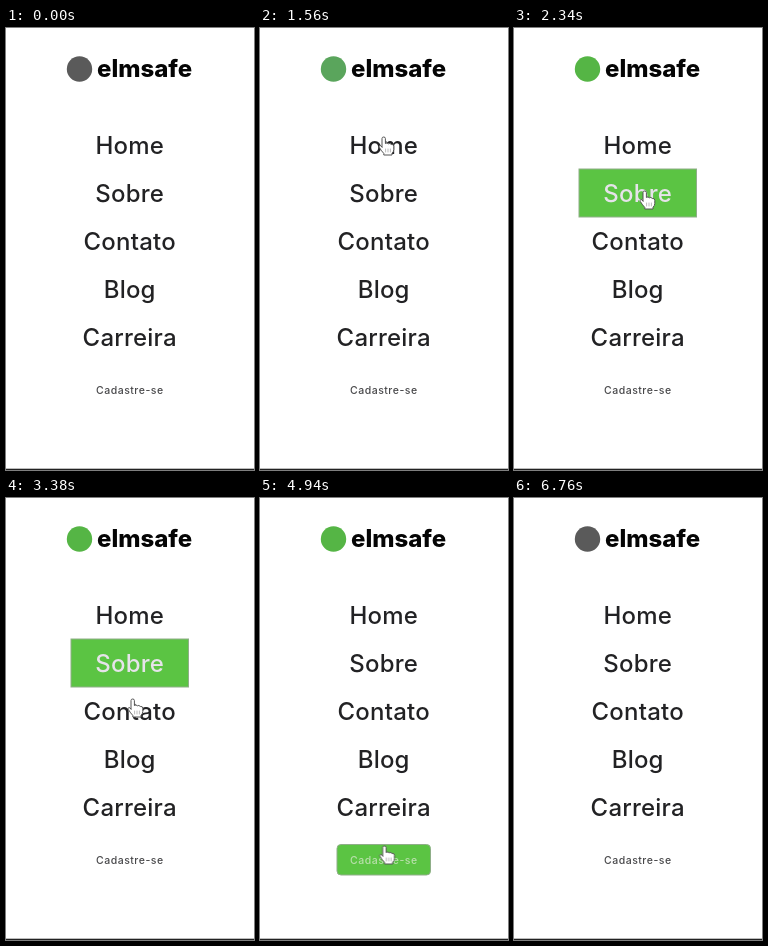
An HTML page that plays this animation: 248 by 442 pixels, repeating every 7.15 s.

```html
<!DOCTYPE html>
<html lang="pt">
<head>
<meta charset="utf-8">
<title>Menu</title>
<style>
  html, body { margin: 0; width: 100%; height: 100%; overflow: hidden; background: #fff; }
  svg { display: block; width: 248px; height: 442px; font-family: Inter, Roboto, sans-serif; }

  /* One loop is 55 ticks of 130 ms, so a tick is 1.818 % */
  .logo, .sobre, .join, .pointer, .arrow, .hand, .sobre-text, .join-text {
    animation: 7150ms step-end infinite;
  }

  .brand { font-size: 24px; font-weight: 800; fill: #050505; }
  .links { font-size: 24px; font-weight: 500; letter-spacing: .2px; fill: #222224; text-anchor: middle; }
  .join-text { font-size: 10.5px; font-weight: 500; letter-spacing: .5px; fill: #48484a; text-anchor: middle; }
  .box { fill: #5bc443; stroke: #8fae88; stroke-width: 1; }

  .logo { animation-name: logo; }
  .sobre { animation-name: sobre; }
  .sobre-text { animation-name: sobre-text; }
  .join { animation-name: join; }
  .join-text { animation-name: join-text; }
  .pointer { animation-name: move; }
  .arrow { animation-name: arrow; }
  .hand { animation-name: hand; }

  @keyframes logo {
    0% { fill: #5a5a5a; }
    9.09% { fill: #5aa55c; }
    25.454% { fill: #55b545; }
    49.09% { fill: #5aa55c; }
    69.09% { fill: #55b545; }
    83.636% { fill: #5aa55c; }
    92.727%, 100% { fill: #5a5a5a; }
  }
  @keyframes sobre {
    0% { opacity: 0; }
    25.454% { opacity: 1; }
    49.09%, 100% { opacity: 0; }
  }
  @keyframes sobre-text {
    0% { fill: #222224; }
    25.454% { fill: #e6e3ea; }
    49.09%, 100% { fill: #222224; }
  }
  @keyframes join {
    0% { opacity: 0; }
    69.09% { opacity: 1; }
    83.636%, 100% { opacity: 0; }
  }
  @keyframes join-text {
    0% { fill: #48484a; }
    69.09% { fill: #b9dfac; }
    83.636%, 100% { fill: #48484a; }
  }
  @keyframes move {
    0% { transform: translate(126px, 450px); }
    9.09% { transform: translate(126px, 450px); animation-timing-function: steps(6, jump-start); }
    20% { transform: translate(120.5px, 82px); animation-timing-function: steps(6, jump-start); }
    30.909% { transform: translate(131px, 163px); }
    41.818% { transform: translate(131px, 163px); animation-timing-function: steps(6, jump-start); }
    52.727% { transform: translate(125px, 220px); animation-timing-function: steps(6, jump-start); }
    63.636% { transform: translate(124px, 310px); animation-timing-function: steps(6, jump-start); }
    74.545% { transform: translate(125px, 367px); }
    81.818% { transform: translate(125px, 367px); animation-timing-function: steps(4, jump-start); }
    89.09%, 100% { transform: translate(126px, 450px); }
  }
  @keyframes arrow {
    0% { opacity: 1; }
    21.818% { opacity: 0; }
    50.909% { opacity: 1; }
    67.272% { opacity: 0; }
    83.636%, 100% { opacity: 1; }
  }
  @keyframes hand {
    0% { opacity: 0; }
    21.818% { opacity: 1; }
    50.909% { opacity: 0; }
    67.272% { opacity: 1; }
    83.636%, 100% { opacity: 0; }
  }
</style>
</head>
<body>
<svg viewBox="0 0 248 442">
  <circle class="logo" cx="73.5" cy="41" r="12.7"/>
  <text class="brand" x="91" y="49">elmsafe</text>

  <rect class="box sobre" x="65" y="141" width="117.5" height="48"/>
  <g class="links">
    <text x="123.7" y="126">Home</text>
    <text class="sobre-text" x="123.7" y="174">Sobre</text>
    <text x="123.7" y="222">Contato</text>
    <text x="123.7" y="270">Blog</text>
    <text x="123.7" y="318">Carreira</text>
  </g>

  <rect class="box join" x="77" y="346.5" width="93.5" height="30.5" rx="4"/>
  <text class="join-text" x="123.8" y="366">Cadastre-se</text>

  <rect y="440.7" width="248" height="1.3" fill="#222"/>

  <g class="pointer">
    <path class="arrow" d="M.2 1.2V15.4L3.5 12.4L5.8 17.6L8.1 16.5L5.8 11.5H10.2Z"
      fill="#111" stroke="#fff" stroke-width=".8"/>
    <g class="hand" stroke="#555" stroke-linejoin="round" stroke-linecap="round">
      <path d="M-2 10V1.5Q-2 0 -.3 0T1.4 1.5V6.5Q3 5.2 4.4 6.8Q6 5.8 7.2 7.4Q9.8 7 9.8 9.4V12.5Q9.6 15 8 16.2V18H-.2V16.4Q-2.4 14.2 -4.6 10.6Q-5.4 8.9 -4.2 8.5Q-3.2 8.3 -2 10Z"
        fill="#fff" stroke-width="1"/>
      <path d="M1.6 12V15M4 12V15M6.4 12V15" fill="none" stroke-width=".4"/>
    </g>
  </g>
</svg>
</body>
</html>
```
